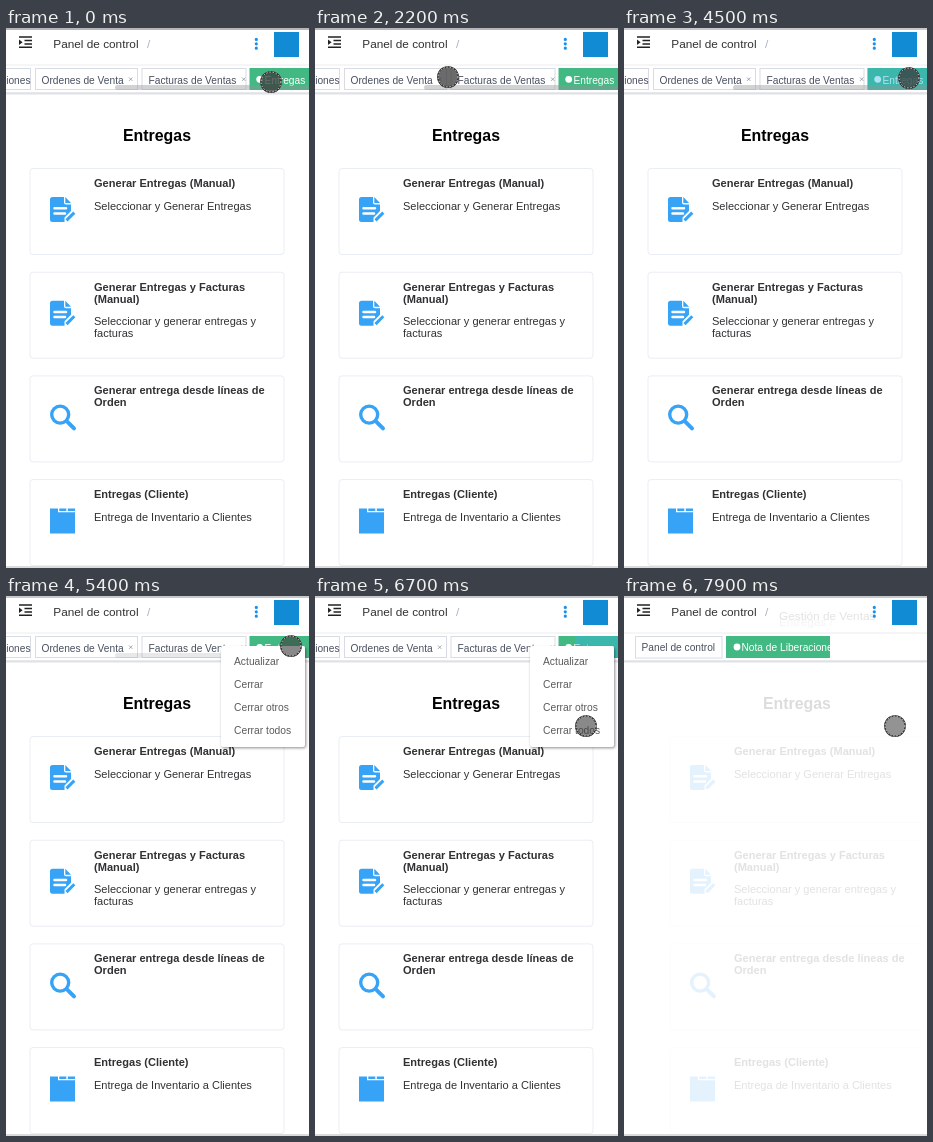
Write an HTML page that moves like this. It is 303x540 px and loops after 8000 ms.

```html
<!DOCTYPE html>
<html lang="es">
<head>
<meta charset="utf-8">
<title>Entregas</title>
<style>
html, body { margin: 0; width: 100%; height: 100%; overflow: hidden; background: #fff; }
svg { display: block; width: 100%; height: 100%; font-family: "Liberation Sans", Arial, sans-serif; }
.tab { fill: #fff; stroke: #d8dce5; }
.tabs text { font-size: 10.2px; fill: #495060; }
.tabs .on { fill: #fff; }
.card rect { fill: #fff; stroke: #e9edf5; }
.card text { font-size: 11.06px; fill: #303133; }
.card .head { font-weight: bold; }
.icon { fill: #36a3f7; }
.line { fill: none; stroke: #36a3f7; }
.menu text { font-size: 10.3px; fill: #5b5b5b; }
</style>
</head>
<body>
<svg viewBox="0 0 303 540">
  <defs>
    <clipPath id="tabClip"><rect x="102" y="38" width="104" height="26"/></clipPath>
    <filter id="soft" x="-20%" y="-20%" width="140%" height="140%"><feGaussianBlur stdDeviation="1.6"/></filter>
    <linearGradient id="shade" x2="0" y2="1">
      <stop stop-color="#cfd2d8"/><stop offset="1" stop-color="#fff"/>
    </linearGradient>
    <g id="note">
      <path class="icon" d="M2.5 0H14V5.5Q14 7.5 16 7.5H21V14L14.5 20.5V25H2.5Q0 25 0 22.5V2.5Q0 0 2.5 0ZM15.3 0L21 6H15.3Z"/>
      <path d="M4.5 11.3H16M4.5 16.4H15" stroke="#fff" stroke-width="2.5" stroke-linecap="round"/>
      <path class="line" d="M16.5 23.4L24.3 15.6" stroke-width="3"/>
    </g>
    <g id="lens">
      <circle class="line" cx="10.2" cy="10.2" r="8.5" stroke-width="3.4"/>
      <path class="line" d="M16.7 16.7L24 24" stroke-width="4" stroke-linecap="round"/>
    </g>
    <g id="box">
      <path class="icon" d="M0 .5H8V4.2H25V25.5H0ZM9.3 .5H16.3V2.8H9.3ZM17.8 .5H25V2.8H17.8Z"/>
    </g>
  </defs>
  <rect width="303" height="540" fill="#fff"/>

  <g id="page">
    <text x="151" y="113" font-size="15.9" font-weight="bold" text-anchor="middle">Entregas</text>
    <g id="cards"></g>
  </g>

  <rect width="303" height="66" fill="#fff"/>
  <rect id="topLine" width="303" height="2"/>
  <path d="M13 9H26M18.5 12.5H26M18.5 16H26M13 19.3H26" stroke="#222" stroke-width="1.5"/>
  <path d="M13 11.5L16.6 14.2L13 17Z" fill="#222"/>
  <text x="47.3" y="20" font-size="11.8" fill="#303133">Panel de control</text>
  <text x="141" y="20" font-size="11.8" fill="#a9b3c2">/</text>
  <g id="crumbs" font-size="11.8" fill="#303133">
    <text x="155" y="24">Gestión de Ventas</text>
    <text x="155" y="30" opacity=".4">Entregas /</text>
  </g>
  <path d="M250.3 11.4v0m0 4.4v0m0 4.4v0" stroke="#1890ee" stroke-width="3.2" stroke-linecap="round"/>
  <rect x="268" y="4" width="25" height="25" fill="#118bd3"/>
  <path d="M0 37H303" stroke="#ececef"/>
  <rect y="64.5" width="303" height="3" fill="url(#shade)"/>

  <g id="oldTabs" class="tabs">
    <rect class="tab" x="-60" y="40.5" width="84.5" height="21"/>
    <rect class="tab" x="29.5" y="40.5" width="102" height="21"/>
    <rect class="tab" x="136" y="40.5" width="104" height="21"/>
    <text x="24.5" y="55.8" text-anchor="end">iones</text>
    <text x="35.5" y="55.8">Ordenes de Venta</text>
    <text x="142.5" y="55.8">Facturas de Ventas</text>
    <path d="M123 49.5l3.4 3.4m0-3.4l-3.4 3.4M236 49.5l3.4 3.4m0-3.4l-3.4 3.4" stroke="#7d8490" stroke-width=".7"/>
    <rect x="243.5" y="40" width="60" height="22" fill="#42b983"/>
    <circle cx="253.7" cy="51.3" r="3.4" fill="#fff"/>
    <text class="on" x="258.5" y="55.8">Entregas</text>
    <rect id="tap" y="40" width="60" height="22" fill="#33b5e5" opacity=".4"/>
    <rect id="bar" x="109" y="57" width="200" height="5" rx="2.5" fill="#909399"/>
  </g>
  <g id="newTabs" class="tabs">
    <rect class="tab" x="11.5" y="40.5" width="86.5" height="21.5"/>
    <text x="17.5" y="55.2">Panel de control</text>
    <g clip-path="url(#tabClip)">
      <rect x="102" y="40" width="110" height="22" fill="#42b983"/>
      <circle cx="113" cy="51" r="3.4" fill="#fff"/>
      <text class="on" x="117.5" y="55.2">Nota de Liberaciones</text>
    </g>
  </g>

  <g id="menu" class="menu">
    <rect x="216" y="52" width="84" height="100" rx="2" opacity=".45" filter="url(#soft)"/>
    <rect x="215" y="50" width="84" height="101" rx="2" fill="#fff"/>
    <g id="items"></g>
  </g>
  <path d="M0 539H303" stroke="#cfcfcf" stroke-width="1.4"/>

  <g id="cursor">
    <circle id="disc" r="10.8" fill="#3a3a3a"/>
    <circle r="10.2" fill="none" stroke="#333" stroke-width="1.3"/>
    <circle r="9.9" fill="none" stroke="#e4e4e4" stroke-dasharray="1.3 1.9"/>
  </g>
</svg>
<script>
const LOOP = 8000, STEP = 100;
const $ = id => document.getElementById(id);
const set = (id, attr, value) => $(id).setAttribute(attr, value);
const show = (id, on) => set(id, "visibility", on ? "visible" : "hidden");

const cards = [
  ["note", ["Generar Entregas (Manual)"], ["Seleccionar y Generar Entregas"]],
  ["note", ["Generar Entregas y Facturas", "(Manual)"], ["Seleccionar y generar entregas y", "facturas"]],
  ["lens", ["Generar entrega desde líneas de", "Orden"], []],
  ["box", ["Entregas (Cliente)"], ["Entrega de Inventario a Clientes"]]
];
const lines = (list, x, y, gap, cls = "") =>
  list.map((s, i) => `<text class="${cls}" x="${x}" y="${Math.round(y) + i * gap}">${s}</text>`).join("");

$("cards").innerHTML = cards.map(([icon, head, body], i) => {
  const y = 140.5 + i * 103.7;
  return `<g class="card"><rect x="24" y="${y}" width="254" height="86" rx="3"/>
    <use href="#${icon}" x="44" y="${y + 28.5}"/>
    ${lines(head, 88, y + 18.4, 12, "head")}${lines(body, 88, y + 29.2 + head.length * 12, 12)}</g>`;
}).join("");
$("items").innerHTML = lines(["Actualizar", "Cerrar", "Cerrar otros", "Cerrar todos"], 228, 69, 23);

// Pointer moves: start, end, x, y
const moves = [
  [0, 100, 276, 55], [1320, 1700, 106, 54], [1900, 2500, 160, 44], [3100, 3200, 279, 55],
  [3200, 3500, 291, 61], [3600, 3800, 285, 50], [5600, 6300, 271, 130]
];

const ramp = (t, a, b) => Math.min(1, Math.max(0, (t - a) / (b - a)));
const ease = u => u * u * (3 - 2 * u);

function pointer(t) {
  let x = 265, y = 54;
  for (const [a, b, toX, toY] of moves) {
    const k = ease(ramp(t, a, b));
    x += (toX - x) * k;
    y += (toY - y) * k;
  }
  return `translate(${x} ${y})`;
}

function draw(ms) {
  const t = Math.floor(ms % LOOP / STEP) * STEP;
  const leaving = t >= 7700;
  const opened = ramp(t, 4900, 5100);
  const gone = ease(ramp(t, 7600, 7990));

  set("cursor", "transform", pointer(t));
  set("disc", "opacity", .75 - .15 * opened - .05 * ramp(t, 7300, 7500));
  set("topLine", "fill", t < 4300 ? "#b4b6ba" : "#c6c8cb");
  set("bar", "opacity", .42 * (1 - ramp(t, 5300, 5500)));
  set("menu", "opacity", leaving ? 0 : opened);

  // The tap tint covers the tab, then stays where the pointer left it
  const left = t >= 5700;
  set("tap", "x", left ? 260 : 243.5);
  set("tap", "display", left || t >= 4500 && t < 5000 ? "inline" : "none");

  show("oldTabs", !leaving);
  show("newTabs", leaving);
  set("crumbs", "opacity", leaving ? 1 - gone : 0);
  set("page", "opacity", 1 - gone);
  set("page", "transform", `translate(${25.4 * gone} 0)`);
}

const start = performance.now();
function tick() {
  draw(performance.now() - start);
  requestAnimationFrame(tick);
}
tick();
</script>
</body>
</html>
```
